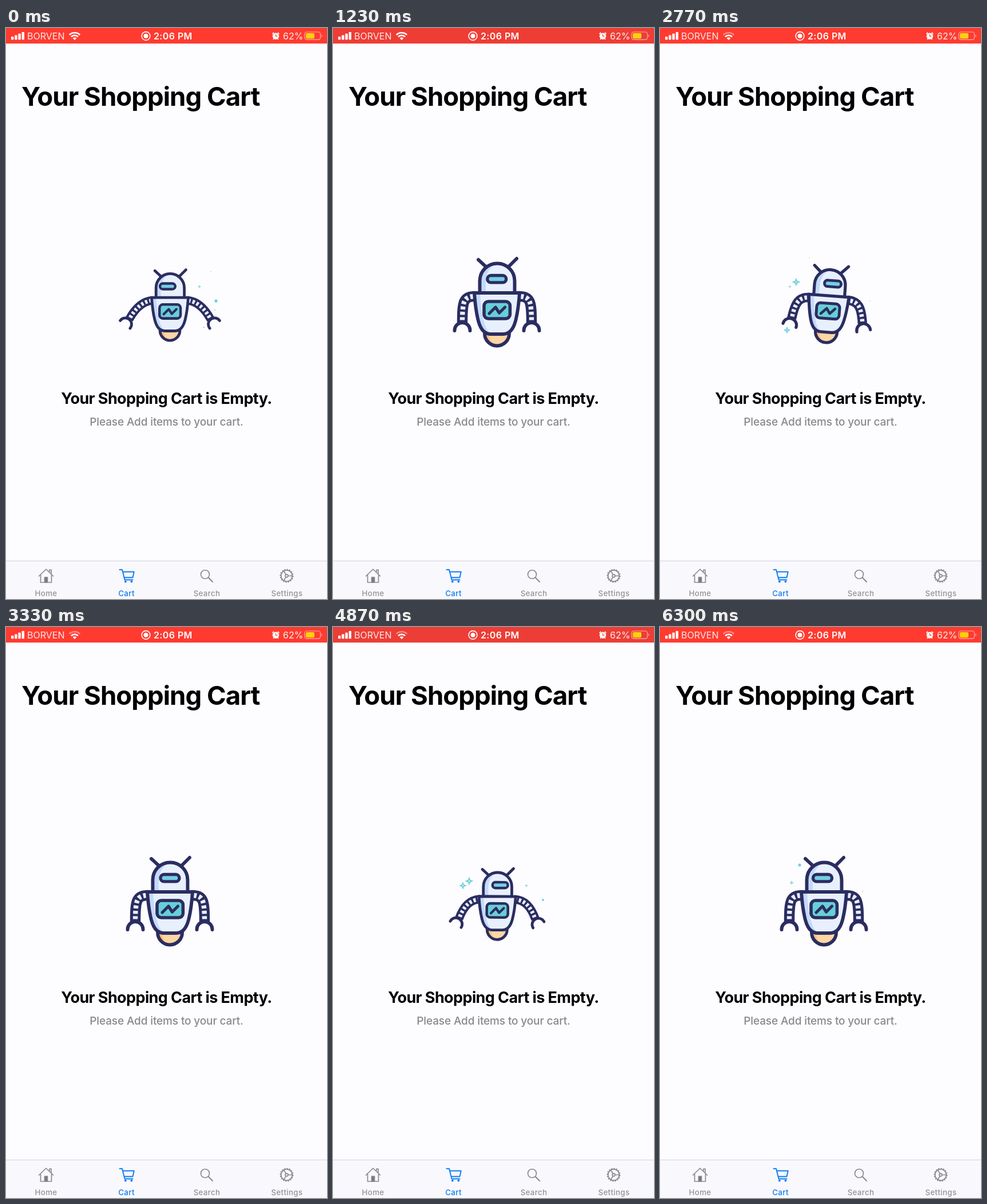
An HTML page that plays this animation: 561 px wide and 998 px high, repeating every 6330 ms.

```html
<!DOCTYPE html>
<html lang="en">
<head>
<meta charset="utf-8">
<title>Empty cart</title>
<style>
  html, body { margin: 0; width: 100%; height: 100%; overflow: hidden; background: #fdfcff; }
  svg { display: block; width: 561px; height: 998px; }
  text { font-family: Inter, "Liberation Sans", sans-serif; }
  .line { fill: none; stroke: #2b2d60; stroke-width: 5.9; stroke-linecap: round; stroke-linejoin: round; }
  .mid { text-anchor: middle; }
  .status { font-size: 16px; fill: #fff; }
  .tab { font-size: 13.3px; font-weight: 500; letter-spacing: .35px; text-anchor: middle; fill: #929297; }
  .icon { fill: none; stroke: #8a8a8f; stroke-width: 1.7; stroke-linejoin: round; stroke-linecap: round; }
  .active { stroke: #0b7cf2; stroke-width: 1.9; }
  .tab.on { fill: #0b7cf2; }
</style>
</head>
<body>
<svg viewBox="0 0 561 998">
  <rect width="561" height="998" fill="#fdfcff"/>

  <!-- status bar -->
  <rect id="bar" width="561" height="27.2" fill="#ff3b30"/>
  <g fill="#fff">
    <rect x="9" y="15" width="4.4" height="5.5" rx="1"/>
    <rect x="15.2" y="12.5" width="4.4" height="8" rx="1"/>
    <rect x="21.4" y="9.8" width="4.4" height="10.7" rx="1"/>
    <rect x="27.6" y="7" width="4.4" height="13.5" rx="1"/>
  </g>
  <text class="status" x="37" y="20" opacity=".88">BORVEN</text>
  <g fill="none" stroke="#fff" stroke-width="2.7">
    <path id="wifi" d="M110.8 12A13.2 13.2 0 0 1 129.2 12"/>
    <path d="M114 15.4A8.6 8.6 0 0 1 126 15.4"/>
    <path d="M120 21.2L116.6 17.8A4.8 4.8 0 0 1 123.4 17.8Z" fill="#fff" stroke="none"/>
  </g>
  <circle cx="244.5" cy="14" r="7.4" fill="none" stroke="#fff" stroke-width="1.6"/>
  <circle cx="244.5" cy="14" r="4" fill="#fff"/>
  <text class="status" x="258" y="20" font-weight="600" letter-spacing=".4">2:06 PM</text>
  <g stroke="#fff" stroke-width="1.7" stroke-linecap="round">
    <circle cx="471.5" cy="14.2" r="5.7" fill="#fff" stroke="none"/>
    <path d="M466 10L467.6 8.4M477 10L475.4 8.4M467.4 19.5L468 18.9M475.6 19.5L475 18.9"/>
    <path d="M471.5 11V14.4H474" fill="none" stroke="#ff3b30" stroke-width="1.1"/>
  </g>
  <text class="status" x="484" y="20" opacity=".92">62%</text>
  <rect x="522" y="7" width="27.5" height="13.4" rx="3.8" fill="none" stroke="#fff" stroke-opacity=".6" stroke-width="1.2"/>
  <rect x="524" y="9" width="15" height="9.4" rx="2" fill="#ffcf0a"/>
  <path d="M551.3 11.5Q554 13.7 551.3 16Z" fill="#fff" fill-opacity=".65"/>

  <!-- copy -->
  <text x="27" y="136" font-size="45.5" font-weight="700" letter-spacing="-.95">Your Shopping Cart</text>
  <text class="mid" x="280.5" y="657" font-size="27" font-weight="700" letter-spacing="-.6">Your Shopping Cart is Empty.</text>
  <text class="mid" x="280.5" y="695" font-size="19" font-weight="500" letter-spacing="-.13" fill="#88888d">Please Add items to your cart.</text>

  <!-- robot -->
  <g id="robot">
    <g id="arms"></g>
    <circle cx="286.5" cy="534" r="21.5" fill="#fdd6a2"/>
    <path d="M265 534A21.5 21.5 0 0 0 282 555Q273 548 273 534Z" fill="#fbc27f"/>
    <circle class="line" cx="286.5" cy="534" r="21.5"/>
    <path class="line" d="M254 405L267 417M321 403L307 417"/>
    <path d="M256.5 462V442A30.5 30.5 0 0 1 317.5 442V462Z" fill="#e8f0fe"/>
    <path d="M256.5 462V442A30.5 30.5 0 0 1 287 411.5Q267 420 267 446V462Z" fill="#c3dafa"/>
    <path class="line" d="M256.5 462V442A30.5 30.5 0 0 1 317.5 442V462"/>
    <rect id="eye" class="line" x="270" y="432.5" width="33" height="12.4" rx="6.2" style="fill:#73cfe2;stroke-width:5.4"/>
    <path d="M247 463Q249 493 254 512Q260 535 276 535H297Q313 535 319 512Q324 493 326 463Z" fill="#e8f0fe"/>
    <path d="M247 463H257Q259 500 264 514Q268 530 277 535Q260 535 254 512Q249 493 247 463Z" fill="#c3dafa"/>
    <path class="line" d="M247 463Q249 493 254 512Q260 535 276 535H297Q313 535 319 512Q324 493 326 463Z"/>
    <rect class="line" x="264" y="478" width="45.4" height="30" rx="7.5" style="fill:#67cfd6;stroke-width:5.6"/>
    <path class="line" d="M273 499L284 488L290.5 498L300.5 488" style="stroke-width:5.2"/>
    <path id="glint" class="line" d="M273 499L284 488L290.5 498L300.5 488" pathLength="100" stroke-dasharray="35 300" style="stroke:#fff;stroke-linecap:butt"/>
  </g>
  <g id="sparks" fill="#6fd2da"></g>

  <!-- tab bar -->
  <rect y="931.6" width="561" height="67" fill="#f9f8fd"/>
  <rect y="931" width="561" height="1" fill="#d3d3df"/>
  <g class="icon">
    <path d="M57.5 958L70 946L82.5 958M60.5 956V969H79.5V956M76 951V947H79V954.5"/>
    <rect x="67.5" y="960" width="5" height="9" fill="#77777c"/>
  </g>
  <g class="icon active">
    <path d="M198.5 946.8H203L207.5 964.5H221.5M204 950.5H223.8L221.5 960.5H206.5"/>
    <circle cx="208.8" cy="967.6" r="1"/><circle cx="219.4" cy="967.6" r="1"/>
  </g>
  <g class="icon">
    <circle cx="348" cy="955" r="7.5"/>
    <path d="M353.6 960.6L361 968" stroke-width="2.1"/>
  </g>
  <g class="icon" transform="translate(490.5 957.5)">
    <circle r="9.8"/>
    <circle r="11.2" pathLength="64" stroke-width="1.7" stroke-dasharray="2 2" stroke-linecap="butt"/>
    <circle r="2.4"/>
    <path d="M2.4 0H9.8M-1.2 -2.1L-4.9 -8.5M-1.2 2.1L-4.9 8.5"/>
  </g>
  <text class="tab" x="70" y="993">Home</text>
  <text class="tab on" x="210.5" y="993">Cart</text>
  <text class="tab" x="351" y="993">Search</text>
  <text class="tab" x="491" y="993">Settings</text>
</svg>

<script>
const LOOP = 6330, CYCLE = 2150, PULSE = 3150;
const $ = id => document.getElementById(id);

function set(el, attrs) {
  for (const k in attrs) el.setAttribute(k, attrs[k]);
}
function add(parent, tag, attrs = {}) {
  const el = document.createElementNS("http://www.w3.org/2000/svg", tag);
  set(el, attrs);
  return parent.appendChild(el);
}

// Key times and values within one robot cycle
const scaleKeys = [[0, .81], [250, .8], [570, .815], [620, .885], [770, 1], [2000, 1], [2150, .81]];
const tiltKeys = [[0, 0], [560, 0], [625, 4.2], [770, -3], [910, 2], [1050, -1], [1200, 0], [2150, 0]];
const shiftKeys = [[0, 0], [560, 0], [625, 6], [770, -1], [910, 0], [2150, 0]];
const spreadKeys = [[0, 1], [250, 1.04], [570, .78], [620, .35], [770, 0], [2000, 0], [2150, 1]];
const eyeKeys = [[0, -5], [100, -5], [480, 6], [620, 6], [770, 0], [1200, 0], [1500, -8.5],
                 [1870, -8.5], [1920, -4.5], [2000, -2.5], [2150, -5]];

// Smooth interpolation that never overshoots its keys
function at(keys, t) {
  const rate = i => keys[i] && keys[i + 1]
    ? (keys[i + 1][1] - keys[i][1]) / (keys[i + 1][0] - keys[i][0]) : 0;
  const slope = i => {
    const a = rate(i - 1), b = rate(i);
    return a * b > 0 ? 2 * a * b / (a + b) : 0;
  };
  let i = 0;
  while (i < keys.length - 2 && t >= keys[i + 1][0]) i++;
  const [t0, v0] = keys[i], [t1, v1] = keys[i + 1];
  const d = t1 - t0, u = (t - t0) / d, w = 1 - u;
  return v0 * w * w * (1 + 2 * u) + v1 * u * u * (3 - 2 * u)
    + d * u * w * (slope(i) * w - slope(i + 1) * u);
}

// x, y, kind, start, end, largest radius
const sparks = [
  [338, 452, "star", -50, 615, 6], [367, 477, "dot", -100, 632, 4.5],
  [358, 426, "dot", -10, 480, 4], [365, 493, "dot", -20, 450, 3],
  [346, 523, "dot", -20, 450, 3], [227, 452, "star", 250, 632, 9],
  [238, 444, "star", 450, 740, 6.5], [222, 528, "star", 572, 780, 7],
  [261, 402, "star", 618, 950, 6], [202, 458, "dot", 690, 900, 2.7],
  [244, 416, "dot", 1830, 2080, 2.9], [230, 447, "star", 1650, 2040, 6.5],
  [357, 439, "dot", 1500, 2005, 2.8], [354, 462, "star", 1500, 2010, 6.5]
].map(([x, y, kind, start, end, size]) => {
  const g = add($("sparks"), "g");
  if (kind === "star") {
    add(g, "path", { d: "M0-1Q.2-.3 .3-.3Q.4-.2 1 0Q.4.2 .3.3Q.2.4 0 1Q-.2.4-.3.3Q-.4.2-1 0Q-.4-.2-.3-.3Q-.2-.4 0-1Z",
      stroke: "#6fd2da", "stroke-width": .16, "stroke-linejoin": "round" });
    add(g, "circle", { r: .2, fill: "#e6f8fb" });
  } else add(g, "circle", { r: 1 });
  return { g, x, y, start, end, size };
});

function makeArm(mirror) {
  const g = add($("arms"), "g", mirror ? { transform: "translate(573 0) scale(-1 1)" } : {});
  const tube = (color, width, dash) => add(g, "path", {
    fill: "none", stroke: color, "stroke-width": width, ...(dash && { "stroke-dasharray": dash })
  });
  return {
    tubes: [tube("#2b2d60", 18.4), tube("#e8f0fe", 8.4), tube("#2b2d60", 12, "4.2 5.2")],
    claw: add(g, "path", { class: "line", d: "M-13.5 14V13.3A13.5 13.3 0 0 1 13.5 13.3V14" })
  };
}
const arms = [makeArm(false), makeArm(true)];

// Drawn from wrist to shoulder so the stripes keep their place near the hand
function poseArms(s) {
  const mix = (a, b) => a + (b - a) * s;
  const x = mix(226, 198.5), y = mix(515, 510);
  const d = `M${x} ${y}C${mix(226, 211)} ${mix(477, 487)} ${mix(228, 227)} ${mix(469, 471)} 249 469`;
  for (const { tubes, claw } of arms) {
    tubes.forEach(p => p.setAttribute("d", d));
    claw.setAttribute("transform", `translate(${x} ${y}) rotate(${38 * s})`);
  }
}

function draw(time) {
  const t = time % CYCLE;
  $("robot").setAttribute("transform",
    `translate(${286.5 + at(shiftKeys, t)} 506) rotate(${at(tiltKeys, t)}) scale(${at(scaleKeys, t)}) translate(-286.5 -506)`);
  poseArms(at(spreadKeys, t));
  $("eye").setAttribute("transform", `translate(${at(eyeKeys, t)} 0)`);

  set($("glint"), {
    visibility: t > 650 && t < 907 ? "visible" : "hidden",
    "stroke-dashoffset": 35 - (t - 650) * .525
  });

  for (const { g, x, y, start, end, size } of sparks) {
    const local = t > CYCLE + start ? t - CYCLE : t;
    const u = (local - start) / (end - start);
    const r = u > 0 && u < 1 ? size * Math.sin(Math.PI * u) ** .6 : 0;
    g.setAttribute("transform", `translate(${x} ${y}) scale(${r})`);
  }

  const dim = ((1 - Math.cos(2 * Math.PI * time / PULSE)) / 2) ** 1.5;
  $("bar").setAttribute("fill", `rgb(${255 - 20 * dim},${59 + 2 * dim},${48 + 6 * dim})`);
  $("wifi").setAttribute("opacity", time < 2300 ? 1 : .4);
}

let origin;
function tick() {
  const now = performance.now();
  origin ??= now;
  draw((now - origin) % LOOP);
  requestAnimationFrame(tick);
}
tick();
</script>
</body>
</html>
```
